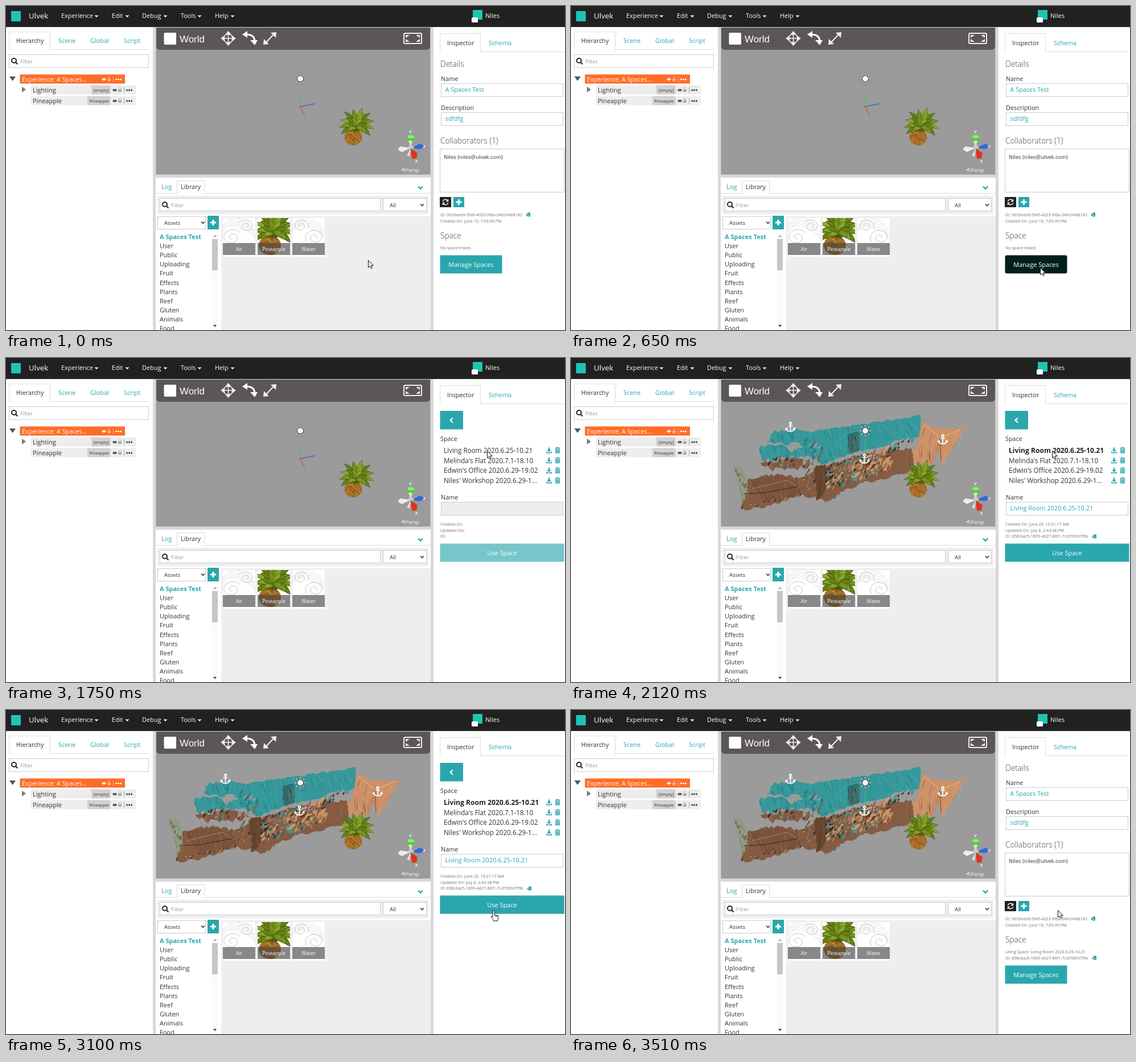
Recreate the animation shown at these times as an HTML page with a canvas. Size 982 by 570 pixels, loop 4510 ms.

```html
<!DOCTYPE html>
<html lang="en">
<head>
<meta charset="utf-8">
<title>Scene editor</title>
<style>
  html, body { margin: 0; width: 100%; height: 100%; overflow: hidden; background: #fff; }
  canvas { display: block; width: 982px; height: 570px; }
</style>
</head>
<body>
<canvas id="stage"></canvas>
<script>
const W = 982, H = 570, LOOP = 4510, STEP = 30;
const TEAL = '#2aa6ad', INK = '#333', GREY = '#707070', LINE = '#ccc', SKY = '#9b9b9b';
const SANS = '"Open Sans", "Noto Sans", sans-serif';
const ARIAL = '"Liberation Sans", Arial, sans-serif';
const SPACE_ID = 'ID: 858c6ac5-1869-4d27-86f1-7cd700f47f9b';
const ROOM = 'Living Room 2020.6.25-10.21';
const dpr = window.devicePixelRatio || 1;

const stage = document.getElementById('stage');
let g = setup(stage);

function setup(canvas) {
  canvas.width = W * dpr;
  canvas.height = H * dpr;
  const ctx = canvas.getContext('2d');
  ctx.scale(dpr, dpr);
  return ctx;
}

function seeded(seed) {
  return () => (seed = (seed * 16807) % 2147483647) / 2147483647;
}

// Drawing helpers
function text(s, x, y, size = 11, color = INK, { weight = 400, align = 'left', family = SANS } = {}) {
  g.font = `${weight} ${size}px ${family}`;
  g.textAlign = align;
  g.fillStyle = color;
  g.fillText(s, x, y);
}
function rect(x, y, w, h, color) {
  g.fillStyle = color;
  g.fillRect(x, y, w, h);
}
function box(x, y, w, h, fill = '#fff', border = LINE) {
  rect(x, y, w, h, border);
  rect(x + 1, y + 1, w - 2, h - 2, fill);
}
function round(x, y, w, h, r, color) {
  g.fillStyle = color;
  g.beginPath();
  g.roundRect(x, y, w, h, r);
  g.fill();
}
function trace(p) {
  g.beginPath();
  for (let i = 0; i < p.length; i += 2) g.lineTo(p[i], p[i + 1]);
}
function poly(p, color) {
  trace(p);
  g.fillStyle = color;
  g.fill();
}
function line(p, color, width = 1) {
  trace(p);
  g.strokeStyle = color;
  g.lineWidth = width;
  g.stroke();
}
function path(d, x, y, fill, stroke, width = 1) {
  const shape = new Path2D(d);
  g.save();
  g.translate(x, y);
  if (fill) { g.fillStyle = fill; g.fill(shape); }
  if (stroke) { g.strokeStyle = stroke; g.lineWidth = width; g.stroke(shape); }
  g.restore();
}
function disc(x, y, rx, ry, color) {
  g.fillStyle = color;
  g.beginPath();
  g.ellipse(x, y, rx, ry, 0, 0, 7);
  g.fill();
}
function clipped(x, y, w, h, draw) {
  g.save();
  g.beginPath();
  g.rect(x, y, w, h);
  g.clip();
  draw();
  g.restore();
}

// Icons
const caret = (x, y, c = '#fff') => poly([x - 3.5, y - 1.5, x + 3.5, y - 1.5, x, y + 2], c);
const chevron = (x, y, c = INK, w = 1.6, r = 3) => line([x - r, y - r / 2, x, y + r / 2, x + r, y - r / 2], c, w);
const magnifier = (x, y) => path('M3.5-.5A4 4 0 1 1-4.5-.5 4 4 0 0 1 3.5-.5ZM2.3 2.3 6 6', x - .5, y - .5, null, '#222', 2);
const plus = (x, y) => { rect(x - 5, y - 1.5, 10, 3, '#fff'); rect(x - 1.5, y - 5, 3, 10, '#fff'); };
const clip = (x, y) => { round(x - 2, y - 3.5, 5, 7, 1, TEAL); rect(x - 4, y - 1, 5, 3.5, TEAL); line([x - 2, y + 1, x + 1, y + 1], '#fff', .8); };

function rowIcons(x, y, color, lock) {
  path('M-4 0Q0-4.4 4 0 0 4.4-4 0Z', x, y, color);
  disc(x, y, 1.5, 1.5, lock);
  disc(x, y, .8, .8, color);
  rect(x + 6, y - 1, 6, 4, lock);
  path('M-2 0V-1.5a2 2 0 0 1 4 0V0', x + 9, y - 1, null, lock, 1);
  rect(x + 16, y - 5, 1, 10, lock);
  for (let i = 0; i < 3; i++) disc(x + 21.5 + i * 4, y, 1.5, 1.5, color);
}
function spaceIcons(y) {
  path('M-1.2-5H1.2V-1H3.8L0 3-3.8-1H-1.2ZM-5 2H-3.5V3.5H3.5V2H5V5H-5Z', 954, y, TEAL);
  path('M-4.5-4H4.5M-1.5-4V-5.3H1.5V-4M-3.5-3V4.6H3.5V-3M-1.2-2V3M1.2-2V3', 969, y, '#8ccbd0', TEAL, 1);
}
function anchor(x, y) {
  path('M2-6.2A2 2 0 1 1-2-6.2 2 2 0 0 1 2-6.2ZM0-4V8M-4-1.5H4M-7.5 2.5Q-6.5 8 0 8 6.5 8 7.5 2.5M-8.5 5-7.5 2-5 4M8.5 5 7.5 2 5 4', x, y, null, '#fff', 1.7);
}

// Plants and textures
function leaf(angle, length, width, color) {
  const droop = Math.cos(angle) * length * .16;
  g.save();
  g.rotate(angle);
  path(`M0-2Q${length * .55} ${-width - droop} ${length} ${droop} ${length * .5} ${width - droop} 0 2Z`, 0, 0, color, '#44570f', .5);
  path(`M3 0Q${length * .55} ${-droop} ${length * .9} ${droop * .7}`, 0, 0, null, 'rgba(205,215,90,.4)', .7);
  g.restore();
}
function pineapple(x, y, scale) {
  const rnd = seeded(77);
  g.save();
  g.translate(x, y);
  g.scale(scale, scale);
  disc(-6, 19, 15.5, 14, '#a86e27');
  for (let i = 0; i < 90; i++) {
    const a = rnd() * 6.28, r = Math.sqrt(rnd()) * 13;
    rect(-6 + Math.cos(a) * r * 1.1, 19 + Math.sin(a) * r, 1.7, 1.3, i % 2 ? '#7d4c18' : '#c98b39');
  }
  disc(-2, 1, 13, 8, '#48600f');
  const greens = ['#5c7816', '#718e1c', '#86a022'];
  for (let ring = 0; ring < 3; ring++) {
    const count = 10 - ring * 2;
    for (let i = 0; i < count; i++) {
      const a = -3.5 + 3.9 * (i + .15 * rnd()) / (count - 1);
      leaf(a, (30 - ring * 7 - 3 * Math.sin(a)) * (.9 + .15 * rnd()), 7.5, greens[(ring + i) % 3]);
    }
  }
  g.restore();
}
function swirl(x, y, radius, spin, start) {
  for (const gap of [0, 2.2]) {
    g.beginPath();
    for (let a = 0; a < 11; a += .2) {
      const r = gap + (radius - gap) * a / 11;
      g.lineTo(x + r * Math.cos(start + a * spin) * 1.2, y + r * Math.sin(start + a * spin));
    }
    g.strokeStyle = '#bbb';
    g.lineWidth = .5;
    g.stroke();
  }
}
function waves(x, side) {
  swirl(x + 28 - side * 12, 407, 15, side, 1);
  swirl(x + 28 + side * 13, 387, 12, -side, 2);
  for (let i = 0; i < 5; i++) {
    path(`M0 ${12 + i * 3}C12 ${-6 + i * 3} 26 ${i * 4} 38 ${4 + i * 4}S54 ${26 + i * 3} 58 ${20 + i * 4}`, x, 373, null, '#c4c4c4', .5);
  }
}

// Scanned room, painted once on its own layer
function paintRoom() {
  const layer = document.createElement('canvas');
  const main = g;
  g = setup(layer);
  const rnd = seeded(4242);

  function scan(p, color, rough = 2, streak = 0, lean = 0) {
    const out = [];
    for (let i = 0; i < p.length; i += 2) {
      const x = p[i], y = p[i + 1], x2 = p[(i + 2) % p.length], y2 = p[(i + 3) % p.length];
      const n = Math.ceil(Math.hypot(x2 - x, y2 - y) / 5);
      for (let k = 0; k < n; k++) {
        const jitter = k ? rough : 0;
        out.push(x + (x2 - x) * k / n + (rnd() - .5) * jitter, y + (y2 - y) * k / n + (rnd() - .5) * 2 * jitter);
      }
    }
    g.save();
    poly(out, color);
    g.clip();
    const xs = p.filter((_, i) => i % 2 === 0), ys = p.filter((_, i) => i % 2);
    const left = Math.min(...xs), top = Math.min(...ys);
    for (let i = 0; i < streak; i++) {
      const x = left + rnd() * (Math.max(...xs) - left), y = top + rnd() * (Math.max(...ys) - top);
      const shade = rnd() < .5 ? 'rgba(0,0,0,.12)' : 'rgba(255,255,255,.08)';
      line([x, y, x + lean + rnd() * 3, y + 8 + rnd() * 14], shade, .6 + rnd() * 1.8);
    }
    g.restore();
  }
  function shards(count, x, y, w, h, slope, size, colors) {
    for (let i = 0; i < count; i++) {
      const u = rnd(), px = x + u * w, py = y + u * slope + (rnd() - .5) * h;
      const a = size * (.4 + rnd()), b = size * (.5 + 1.4 * rnd());
      poly([px, py, px + a, py - b * .6, px + a * .8, py + b * .2, px + a * .1, py + b * .7], colors[Math.floor(rnd() * colors.length)]);
    }
  }

  const wall = '#35989a', deep = '#257579', floor = '#855b42', tan = '#ce9067', dark = '#3b302a';
  scan([284, 188, 297, 189, 308, 207, 315, 226, 312, 242, 300, 265, 297, 231], '#8d9b80', 2, 30, 4);
  scan([310, 214, 338, 207, 372, 205, 400, 212, 440, 195, 500, 172, 598, 158, 604, 196, 545, 213, 512, 220, 478, 235,
        451, 252, 425, 245, 404, 241, 341, 263, 298, 266, 308, 240], floor, 3, 120, -4);
  scan([333, 184, 375, 178, 405, 177, 428, 190, 385, 195, 350, 196], floor, 4, 25);
  scan([355, 130, 397, 124, 412, 129, 417, 146, 378, 152, 345, 149], wall, 3, 35, 2);
  scan([331, 157, 370, 153, 405, 149, 442, 143, 441, 187, 415, 172, 376, 176, 336, 180], wall, 4, 60, 3);
  scan([397, 129, 430, 128, 500, 118, 615, 101, 613, 137, 591, 142, 566, 152, 530, 160, 498, 166, 441, 187, 425, 160, 405, 152], wall, 2, 130, 3);
  scan([372, 155, 396, 151, 408, 156, 384, 164], SKY, 4);
  scan([563, 148, 592, 140, 602, 146, 588, 157, 566, 161], SKY, 4);
  scan([486, 134, 506, 131, 507, 163, 487, 170], deep, 2, 35);
  for (let i = 0; i < 4; i++) line([488, 140 + i * 8, 505, 137 + i * 8], '#79543f', 2);
  scan([313, 214, 370, 205, 398, 220, 401, 241, 341, 254], '#79533d', 2, 40, 5);
  line([318, 230, 380, 215, 400, 228], '#a8754d', 1.3);
  line([304, 239, 340, 237, 399, 226], '#4c3529', 1.3);
  scan([426, 193, 447, 187, 454, 225, 431, 251], '#68442f', 3, 25);
  scan([617, 113, 650, 125, 691, 122, 684, 139, 653, 187, 647, 169, 608, 155], tan, 2, 60, -7);
  line([619, 117, 648, 140, 684, 126], '#e0ad82', 1.4);
  line([648, 140, 650, 181], '#8e5b3c', 1.3);
  scan([598, 165, 612, 153, 643, 172, 633, 186, 603, 185], tan, 4, 30);

  shards(150, 446, 207, 112, 38, -28, 7, [wall, tan, tan, floor, floor, dark, '#a87350']);
  shards(180, 446, 210, 118, 44, -32, 3.5, [wall, deep, tan, '#d89b6d', floor, dark]);
  shards(55, 512, 190, 45, 42, -15, 6, [tan, '#d89b6d', floor, '#a87350']);
  shards(30, 336, 180, 92, 14, 6, 4, [wall, floor, dark, SKY]);
  shards(35, 410, 155, 30, 30, 12, 4, [wall, deep, SKY, floor]);
  shards(36, 298, 262, 105, 5, -20, 3, [dark, tan, floor]);
  shards(26, 286, 194, 25, 12, 44, 4, ['#9aa48c', '#6e7a66', floor]);
  shards(20, 405, 210, 28, 50, 6, 3, [wall, dark, tan]);
  shards(18, 564, 158, 35, 8, -16, 4, [wall, dark]);
  g = main;
  return layer;
}
const room = paintRoom();

// Interface
function topBar() {
  rect(0, 0, W, 37, '#212121');
  rect(9, 9, 17, 18, '#20c4b5');
  text('Ulvek', 40, 22, 13.4, '#fff');
  [['Experience', 97, 159], ['Edit', 186, 213], ['Debug', 239, 280], ['Tools', 307, 340], ['Help', 367, 398]]
    .forEach(([label, x, arrow]) => { text(label, x, 21, 10.9, '#fff'); caret(arrow, 18); });
  rect(820, 7, 17, 17, '#20c4b5');
  round(818, 20, 11, 9, 1.5, '#fff');
  text('Niles', 842, 21, 11, '#fff');
}
function tab(x, y, w, h, label, labelX, right) {
  rect(x, y + h - 1, right - x, 1, '#ddd');
  box(x, y, w, h, '#fff', '#ddd');
  rect(x + 1, y + h - 1, w - 2, 1, '#fff');
  text(label, labelX, y + h - 12, 10.8);
}
function hierarchy() {
  tab(5, 45, 73, 32, 'Hierarchy', 18, 251);
  [['Scene', 92], ['Global', 148], ['Script', 207]].forEach(([s, x]) => text(s, x, 65, 10.9, TEAL));
  box(5, 85, 246, 24);
  magnifier(15, 97);
  text('Filter', 25, 101, 9.4, '#999');

  poly([6, 124, 17, 124, 11.5, 132], '#555');
  rect(24.5, 120.5, 184.5, 16, '#ff6c26');
  text('Experience: A Spaces...', 28, 133, 10.8, '#fff');
  rowIcons(172, 129, '#fff', '#ffb08b');
  poly([28, 142, 35, 147, 28, 152], '#777');
  [['Lighting', '[empty]', 140, 150], ['Pineapple', 'Pineapple', 159, 143]].forEach(([name, tag, y, x]) => {
    rect(43.5, y - .5, 184.5, 16, '#ededed');
    rect(x, y - .5, 183.5 - x, 16, '#d2d2d2');
    text(name, 47, y + 12, 11);
    text(tag, 181, y + 10.5, 7.5, INK, { align: 'right' });
    rowIcons(191, y + 8, INK, '#aaa');
  });
}
function toolbar() {
  round(264, 38, 481, 39, [0, 0, 6, 6], '#5b5757');
  round(277.5, 47, 21.5, 21, 2, '#fff');
  text('World', 305, 64, 16.9, '#fff', { family: ARIAL });
  for (let i = 0; i < 4; i++) {
    g.save();
    g.translate(390.5, 57);
    g.rotate(i * Math.PI / 2);
    path('M0 0V-8M-4-7 0-12 4-7ZM4-7 7-4', 0, 0, '#eee', '#eee', 1.6);
    g.restore();
  }
  path('M5 0Q20 0 20 13', 417, 50, null, '#fff', 3);
  poly([415, 50, 424, 44, 424, 56], '#fff');
  poly([429, 60, 442, 60, 437, 69], '#fff');
  line([456, 65, 471, 49], '#eee', 2);
  poly([475, 46, 465, 47, 474, 56], '#eee');
  poly([452, 68, 453, 58, 462, 67], '#eee');
  g.strokeStyle = '#eee';
  g.lineWidth = 2;
  g.beginPath();
  g.roundRect(699, 48, 31, 18, 2);
  g.stroke();
  [[702, 51, 1, 1], [727, 51, -1, 1], [702, 63, 1, -1], [727, 63, -1, -1]]
    .forEach(([x, y, h, v]) => poly([x, y, x + 7 * h, y, x, y + 5 * v], '#eee'));
}
function gizmo() {
  poly([711, 250, 693, 247, 688, 252, 695, 257], '#eee');
  poly([711, 250, 704, 231, 711, 226, 718, 231], '#57c936');
  disc(711, 230, 6, 3, '#8cf06a');
  poly([711, 250, 728, 242, 734, 246, 729, 252], '#2f6bdc');
  poly([711, 250, 707, 237, 714, 237], '#ddd');
  poly([706, 247, 712, 244, 717, 249, 711, 255], '#c8c8c8');
  poly([711, 250, 723, 259, 721, 268, 713, 269], '#dd3519');
  poly([711, 250, 709, 265, 704, 263], '#ddd');
  text('Y', 710.5, 224, 7.5, '#fff', { weight: 700, align: 'center', family: ARIAL });
  text('z', 735, 249, 8, '#fff', { weight: 700, align: 'center', family: ARIAL });
  text('x', 721, 275, 8, '#fff', { weight: 700, align: 'center', family: ARIAL });
  line([701, 285, 695, 288, 701, 291], '#eee', 1);
  line([695, 288, 701, 288], '#eee', 1);
  text('Persp', 702, 291.5, 9.1, '#eee', { family: ARIAL });
}
function viewport(t) {
  rect(258, 37, 493, 533, '#d8d8d8');
  rect(263.5, 38, 482, 258.5, SKY);
  toolbar();
  if (t >= 2120) g.drawImage(room, 0, 0, W, H);
  line([516.5, 177, 516.5, 153], '#2ed447');
  line([516, 177, 542, 172], '#2e3fe0');
  line([516, 177, 525, 193], '#e02d2d');
  if (t >= 1950) [[385.5, 121], [515.5, 177], [653, 143]].forEach(p => anchor(...p));
  for (let i = 0; i < 8; i++) {
    const c = Math.cos(i * Math.PI / 4), s = Math.sin(i * Math.PI / 4);
    line([517 + c * 7, 128 + s * 7, 517 + c * 11, 128 + s * 11], '#444', 2.6);
    line([517 + c * 7, 128 + s * 7, 517 + c * 10.5, 128 + s * 10.5], '#fff', 1.3);
  }
  disc(517, 128, 6, 6, '#444');
  disc(517, 128, 5, 5, '#f6f6f6');
  pineapple(616, 212, 1);
  gizmo();
}
function library() {
  rect(263, 302, 483, 268, '#fff');
  rect(263, 329, 483, 1, '#ddd');
  box(300, 307, 49, 23, '#fff', '#ddd');
  rect(301, 329, 47, 1, '#fff');
  text('Log', 273, 322, 11.1, TEAL);
  text('Library', 307, 322, 10.8);
  chevron(728, 319.5, TEAL, 2.4, 4);

  rect(266, 334, 476, 32, '#eee');
  box(270, 338, 388, 23);
  magnifier(280, 350);
  text('Filter', 290, 354, 9.4, '#999');
  box(662, 338, 77, 23);
  text('All', 674, 353.5, 9.6);
  chevron(731, 350);

  box(266, 370, 85, 23);
  text('Assets', 278, 385, 9.5);
  chevron(346, 381);
  rect(354, 369, 20, 24, TEAL);
  plus(364, 381);
  ['A Spaces Test', 'User', 'Public', 'Uploading', 'Fruit', 'Effects', 'Plants', 'Reef', 'Gluten', 'Animals', 'Food']
    .forEach((s, i) => text(s, 270, 410 + i * 16.1, 11, i ? INK : TEAL, { weight: i ? 400 : 700 }));
  rect(362, 399, 10, 171, '#fafafa');
  rect(362, 410, 10, 55, '#c6c6c6');
  poly([364, 406, 370, 406, 367, 403], '#999');
  poly([364, 561, 370, 561, 367, 565], '#444');

  rect(378, 370, 368, 200, '#eee');
  [['Air', 381], ['Pineapple', 442], ['Water', 503]].forEach(([name, x], i) => {
    rect(x, 373, 57, 68, '#fff');
    clipped(x, 373, 57, 65, () => i === 1 ? pineapple(x + 29, 397, 1.25) : waves(x, i ? -1 : 1));
    rect(x, 417, 57, 21, i === 1 ? 'rgba(70,70,70,.65)' : 'rgba(110,110,110,.82)');
    text(name, x + 28.5, 431, 8.9, '#fff', { align: 'center' });
  });
}
function button(x, y, w, label, press, hover, color = TEAL) {
  const mix = (a, b) => Math.round(a + (b - a) * press);
  const fill = press ? `rgb(${mix(42, 0)},${mix(166, 32)},${mix(173, 30)})` : color;
  round(x + .5, y + .5, w - 1, 32, press ? 3 : 0, hover ? '#1d7d83' : fill);
  if (hover) rect(x + 1, y + 1, w - 2, 31, fill);
  text(label, x + w / 2, y + 20.5, 11, '#fff', { align: 'center' });
}
function input(y, h, value, fill) {
  box(764, y, 215, h, fill);
  text(value, 771.5, y + 15, 10.9, TEAL);
}
const note = (s, y) => text(s, 763, y, 7.2, GREY);
const heading = (s, y) => text(s, 763, y, 13.7, '#444', { weight: 300 });

function detailsPanel(linked, press, hover) {
  heading('Details', 107);
  text('Name', 764, 132, 10.8);
  input(136, 24, 'A Spaces Test');
  text('Description', 764, 183, 10.9);
  input(187, 24, 'sdfdfg');
  heading('Collaborators (1)', 241.5);
  box(762, 251, 219, 77);
  text('Niles (niles@ulvek.com)', 769, 269, 9.5);
  rect(762, 336, 20, 18, '#212121');
  path('M-4.5-1A4.5 4.5 0 0 1 3.5-3M4.5 1A4.5 4.5 0 0 1-3.5 3M4.5-5V-1.5H1M-4.5 5V1.5H-1', 772, 345, null, '#fff', 1.4);
  rect(786, 336, 19, 18, TEAL);
  plus(795.5, 345);
  note('ID: 9033eee9-596f-4923-9f6a-34fc0f468182', 369.5);
  clip(918, 367);
  note('Created On: June 15, 7:05:39 PM', 380.5);
  heading('Space', 409);
  note(linked ? 'Using Space: ' + ROOM : 'No space linked.', 428);
  if (linked) {
    note(SPACE_ID, 438.5);
    clip(920, 436);
  }
  button(762, linked ? 449 : 438, 110, 'Manage Spaces', press, hover);
}
function spacesPanel(chosen, press, hover) {
  rect(762.5, 93, 40.5, 32.5, TEAL);
  line([785, 105.5, 780.5, 109.5, 785, 113.5], '#fff', 2.2);
  text('Space', 763, 146, 10.8);
  [ROOM, "Melinda's Flat 2020.7.1-18.10", "Edwin's Office 2020.6.29-19.02", "Niles' Workshop 2020.6.29-1..."].forEach((s, i) => {
    const bold = chosen && i === 0;
    text(s, 769, 167 + i * 17.7, bold ? 12.1 : 11.7, bold ? '#222' : INK, { weight: bold ? 700 : 400 });
    spaceIcons(162.5 + i * 17.7);
  });
  text('Name', 764, 249, 10.8);
  input(253, 24, chosen ? ROOM : '', chosen ? '#fff' : '#eee');
  note('Created On:' + (chosen ? ' June 25, 10:21:17 AM' : ''), 295);
  note('Updated On:' + (chosen ? ' July 8, 2:43:38 PM' : ''), 305.5);
  note(chosen ? SPACE_ID : 'ID:', 316);
  if (chosen) clip(920, 314);
  button(762, 326, 219, 'Use Space', press, hover, chosen ? TEAL : '#76c6ca');
}

// Timeline
function progress(t, start, steps) {
  return Math.max(0, Math.min(1, (Math.floor((t - start) / STEP) + 1) / steps));
}
const smooth = u => u * u * (3 - 2 * u);

function pointer(t) {
  if (t < 1010) {
    const u = smooth(progress(t, 30, 13));
    return [636 + 188 * u, 447 + 13 * u];
  }
  if (t < 2680) {
    const s = 1 - (1 - progress(t, 1010, 18)) ** 1.85, r = 1 - s;
    return [r * r * 824 + 2 * r * s * 881 + s * s * 845, 460 - 297 * s];
  }
  const u = smooth(progress(t, 2680, 15));
  return [845 + 10 * u, 163 + 189 * u];
}
function cursor(x, y, hand) {
  if (hand) path('M0 1.5a1.5 1.5 0 0 1 3 0v6l6 1.2q1.3.5 1.2 2l-1 4.5-1 2.8h-6.5l-1-2.5-3.5-4.5q0-1.7 1.8-1.2l1 1.3zM5.3 8v3M7.7 8.5v2.7', x, y + 1, '#fff', '#111', 1);
  else path('M.5.5V13L3.4 10.3 5.4 14.6 7.4 13.7 5.4 9.5H9.3Z', x, y, '#fff', '#111', 1);
}

function draw(t) {
  rect(0, 0, W, H, '#fff');
  topBar();
  hierarchy();
  viewport(t);
  library();
  rect(751, 37, 231, 533, '#fff');
  tab(762, 48, 72, 33, 'Inspector', 775, 981);
  text('Schema', 848, 69, 10.9, TEAL);

  const [x, y] = pointer(t);
  let hand = false;
  if (t < 680) {
    const press = progress(t, 590, 3);
    hand = !press && x >= 762;
    detailsPanel(false, press, hand);
  } else if (t < 3420) {
    const press = progress(t, 3330, 3);
    hand = !press && t >= 2680 && y >= 326;
    spacesPanel(t >= 1780, press, hand);
  } else {
    detailsPanel(true, 0, false);
  }
  cursor(x, y, hand);
}

const begin = performance.now();
function tick() {
  draw((performance.now() - begin) % LOOP);
  requestAnimationFrame(tick);
}
tick();
</script>
</body>
</html>
```
